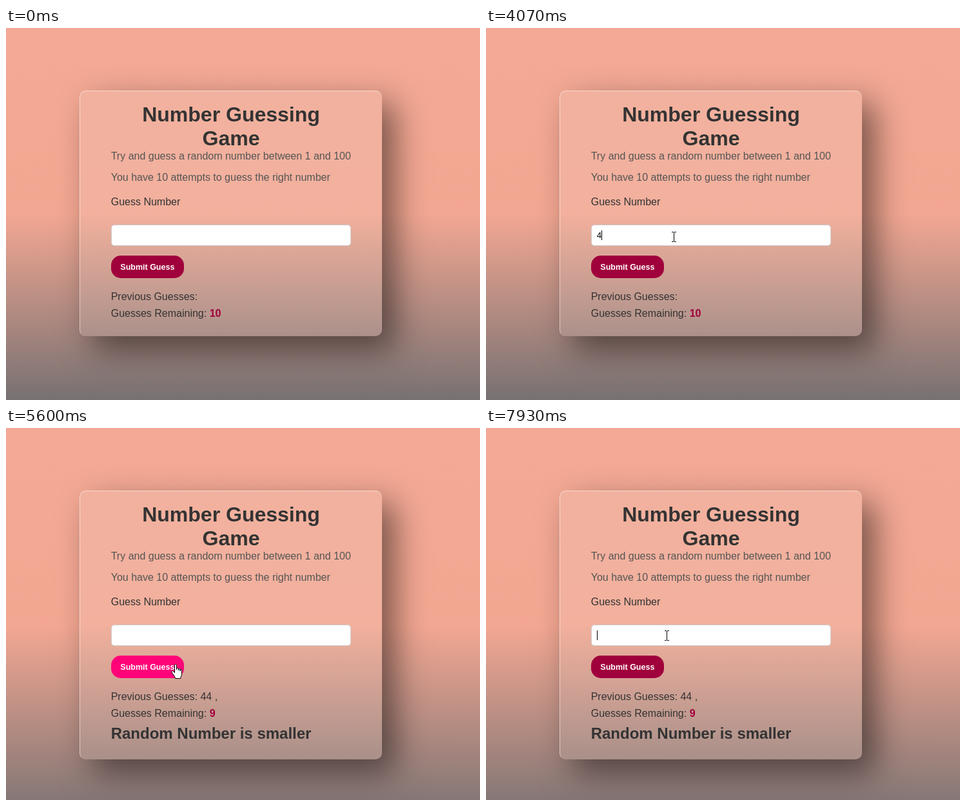
These frames come from a looping animation (735x577 px, 8 s). An HTML page:

```html
<!DOCTYPE html>
<html lang="en">
<head>
<meta charset="utf-8">
<title>Number Guessing Game</title>
<style>
  html, body { margin: 0; width: 100%; height: 100%; overflow: hidden; }
  #stage {
    --grow: 0px;
    position: relative; width: 735px; height: 577px; overflow: hidden;
    background: linear-gradient(#f3a995, #f3a792 50%, #777172) 0 0 / 100% calc(577px + var(--grow));
  }
  #stage.done { --grow: 36px; }
  #card {
    position: absolute; left: 114px; top: 97px;
    width: 469px; height: calc(381px + var(--grow));
    box-sizing: border-box; border-radius: 10px;
    background: rgba(240, 240, 230, .13);
    border: solid rgba(255, 255, 255, .5); border-width: 1px 0 0 1px;
    box-shadow: 20px 20px 50px rgba(0, 0, 0, .5);
  }
  svg { position: absolute; left: 0; top: 0; }
  text { font: 16px "Liberation Sans", Arial, sans-serif; fill: #333; white-space: pre; }
  .title { font-size: 32px; font-weight: bold; text-anchor: middle; }
  .hint { fill: #555; }
  #typed { font-size: 13.333px; fill: #000; }
  .action { font-size: 12.5px; font-weight: bold; fill: #fff; }
  #left { font-weight: bold; fill: #a0003c; }
  #result { font-size: 24px; font-weight: bold; }
  .ptr { fill: #fff; stroke: #000; stroke-linejoin: round; }
</style>
</head>
<body>
<div id="stage">
  <div id="card"></div>
  <svg width="735" height="577">
    <text class="title" x="349" y="145">Number Guessing</text>
    <text class="title" x="349" y="182">Game</text>
    <text class="hint" x="162.7" y="204">Try and guess a random number between 1 and 100</text>
    <text class="hint" x="162.7" y="237">You have 10 attempts to guess the right number</text>
    <text x="162.7" y="275">Guess Number</text>
    <rect x="163.5" y="305.5" width="371" height="32" rx="4.5" fill="#fff" stroke="#ccc"/>
    <text id="typed" x="171.7" y="326"></text>
    <rect id="caret" y="314" width="1" height="15"/>
    <rect id="button" x="163" y="353" width="113" height="35" rx="15"/>
    <text class="action" x="177.3" y="375">Submit Guess</text>
    <text x="162.7" y="422">Previous Guesses: <tspan id="past"></tspan></text>
    <text x="162.7" y="448">Guesses Remaining: <tspan id="left"></tspan></text>
    <text id="result" x="162.7" y="482"></text>
    <g id="cursor">
      <path id="arrow" class="ptr" d="M.5 .5V16.5L4.2 13L6.7 18.6L9 17.6L6.6 12H11.6Z"/>
      <path id="beam" d="M-3 -7.5H0M1 -7.5H4M.5 -7V7M-3 7.5H0M1 7.5H4" fill="none" stroke="#000"/>
      <path id="hand" class="ptr" transform="translate(-5)" d="M5.5 13V2.2C5.5 0 8.5 0 8.5 2.2V9V7.6C8.5 5.8 11.4 6 11.4 7.9V10V8.3C11.4 6.8 14.1 7 14.1 8.8V11V9.6C14.1 8.2 16.5 8.4 16.5 10.2V15.5C16.5 18.5 14.7 19.5 14.7 22.5H6.6C6.2 19.5 3 16.5 1 12.8C.2 10.8 2.4 10 3.6 11.5L5.5 13.6Z"/>
    </g>
  </svg>
</div>
<script>
const $ = id => document.getElementById(id);

// All times are counted in steps of 1/15 s.
const FPS = 15, STEPS = 120, BLINK = 8, FADE = 3;
const focus = 38, keys = [61, 66], blur = 80, submit = 84, refocus = 119;

// Each move bends from the last end point past `via` to `to`.
const moves = [
  { at: 0, len: 14, via: [249, 372], to: [289, 324] },
  { at: 32, len: 1, via: [290, 324], to: [291, 324] },
  { at: 70, len: 10, via: [275, 345], to: [261, 366] },
  { at: 107, len: 9, via: [262, 344], to: [280, 322] }
];

const show = (id, on) => { $(id).style.display = on ? '' : 'none'; };
const put = (id, s) => { $(id).textContent = s; };

function pointer(n) {
  return moves.reduce((from, { at, len, via, to }) => {
    const u = Math.max(0, Math.min(1, (n - at) / len)), v = 1 - u;
    return from.map((p, i) => v * v * p + 2 * u * v * via[i] + u * u * to[i]);
  }, [735, 577]).map(Math.round);
}

const overInput = ([x, y]) => x < 535 && y > 304 && y < 338;
const overButton = ([x, y]) => x < 276 && y > 352 && y < 388;

function hover(n) {
  let hits = 0;
  for (let i = 0; i < FADE; i++) hits += overButton(pointer(n - i));
  return hits / FADE;
}

function caretOn(n) {
  const active = n >= focus && n < blur || n >= refocus;
  const reset = Math.max(...[focus, ...keys, refocus].filter(s => s <= n));
  return active && (n - reset) % (2 * BLINK) < BLINK;
}

function draw(n) {
  const done = n >= submit;
  $('stage').className = done ? 'done' : '';
  put('past', done ? '44 ,' : '');
  put('left', done ? '9' : '10');
  put('result', done ? 'Random Number is smaller' : '');

  const typed = done ? '' : '4'.repeat(keys.filter(s => n >= s).length);
  put('typed', typed);
  $('caret').setAttribute('x', Math.round(172 + typed.length * 7.41));
  show('caret', caretOn(n));

  const h = hover(n);
  $('button').setAttribute('fill', `rgb(${160 + 95 * h},${4 * h},${60 + 60 * h})`);

  const pos = pointer(n);
  $('cursor').setAttribute('transform', `translate(${pos})`);
  show('beam', overInput(pos));
  show('hand', overButton(pos));
  show('arrow', !overInput(pos) && !overButton(pos));
}

const start = performance.now();
let last = -1;
function tick() {
  const t = Math.max(0, performance.now() - start);
  const n = Math.floor((t + 4) * FPS / 1000) % STEPS;
  if (n !== last) draw(last = n);
  requestAnimationFrame(tick);
}
tick();
</script>
</body>
</html>
```
